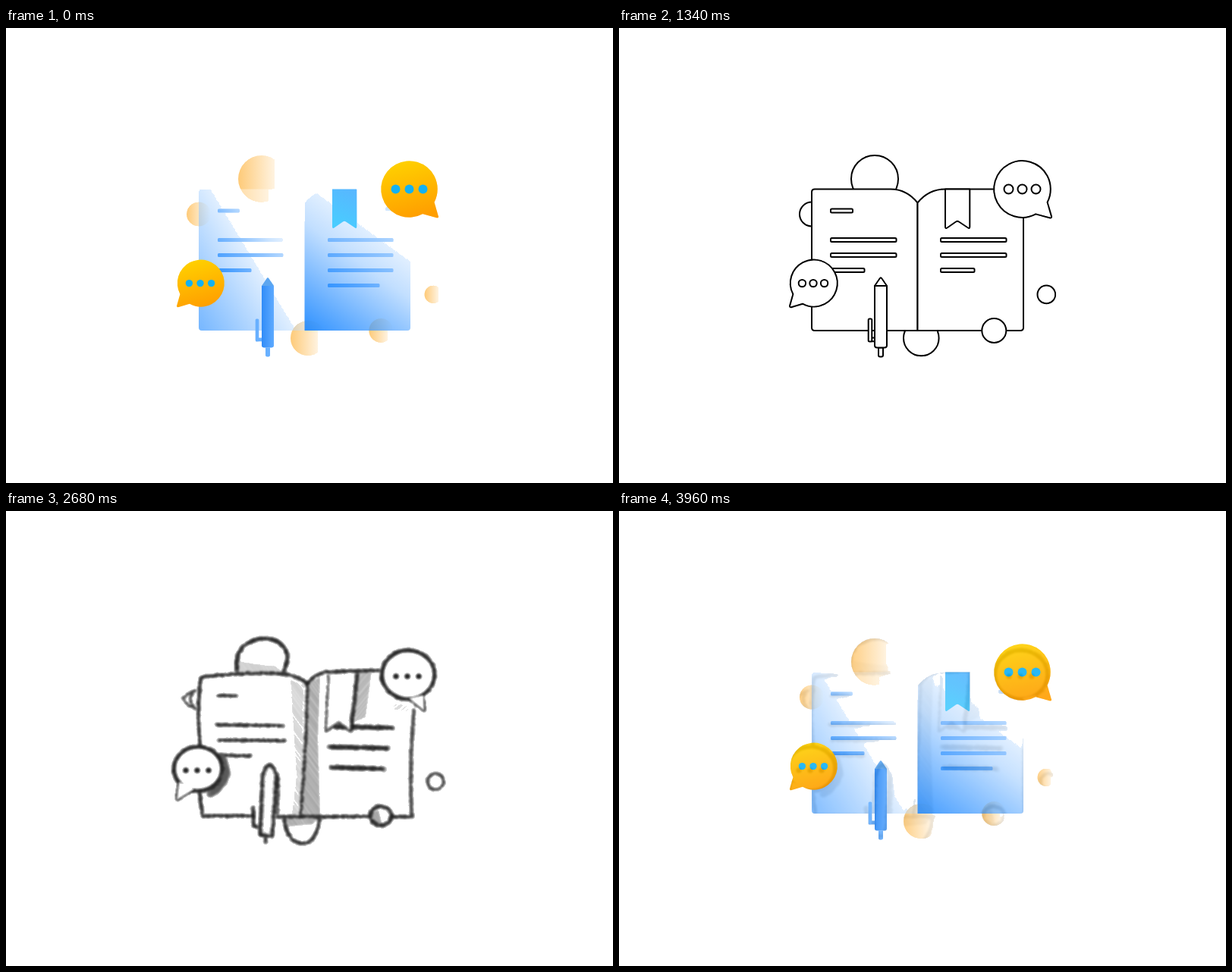
These frames come from a looping animation (800x600 px, 4020 ms). An HTML page with a canvas:

```html
<!DOCTYPE html>
<html lang="en">
<head>
<meta charset="utf-8">
<title>Notebook: sketch, outline, colour</title>
<style>
html, body { margin: 0; width: 100%; height: 100%; overflow: hidden; background: #fff; }
canvas { display: block; }
</style>
</head>
<body>
<canvas id="stage" width="800" height="600"></canvas>
<script>
const W = 800, H = 600, TAU = Math.PI * 2;

function layer(draw) {
  const c = document.createElement('canvas');
  c.width = W; c.height = H;
  const g = c.getContext('2d', { willReadFrequently: true });
  g.fillStyle = '#fff';
  g.fillRect(0, 0, W, H);
  g.lineCap = g.lineJoin = 'round';
  draw(g, c);
  return g.getImageData(0, 0, W, H).data;
}

// Shapes shared by the colour and outline looks
const disc = (x, y, r) => { const p = new Path2D(); p.arc(x, y, r, 0, TAU); return p; };
const box = (x, y, w, h, r) => { const p = new Path2D(); p.roundRect(x, y, w, h, r); return p; };
const bar = (x, y, w) => box(x, y - 2.5, w, 5, 1.5);
const row = i => 279.5 + 20 * i;
const rowWidth = i => i < 2 ? 86.5 : 44.5;

function bubble(x, y, r, a, b, tx, ty) {
  const p = new Path2D();
  p.arc(x, y, r, a, b + TAU);
  p.arcTo(tx, ty, x + r * Math.cos(a), y + r * Math.sin(a), 1.5);
  p.closePath();
  return p;
}
const threeDots = (x, y, gap, r) => [-1, 0, 1].map(i => disc(x + i * gap, y, r));

const leftPage = new Path2D('M258 212.5H358Q379 212.5 393.5 230.5V399H258Q254 399 254 395V216.5Q254 212.5 258 212.5Z');
const rightPage = new Path2D('M393.5 230.5Q408 212.5 430 212.5H529Q533 212.5 533 216.5V395Q533 399 529 399H393.5Z');
const ribbon = new Path2D('M430 212.5H462.3V262Q462.3 265 460 263.5L448 255.5Q446 254 444 255.5L432.5 263.5Q430 265 430 262Z');
const penTip = new Path2D('M337 340L343.5 330.5Q345 328 346.5 330.5L353 340Z');
const penBody = box(337, 340, 16, 81.5, [0, 0, 3, 3]);
const penEnd = box(342, 421.5, 6, 12, [0, 0, 2, 2]);
const clipBar = box(328.7, 383.5, 4.6, 30, 1.5);
const clipArm = box(332.5, 408.5, 4.5, 4.8, 0);
const balls = [[337, 199, 31], [254, 245.5, 16], [398.3, 409, 23.3], [494.3, 399, 16], [563.3, 351.4, 11.8]];
const bigBubble = bubble(531.5, 212.5, 37.3, 1.077, .481, 570.8, 251.2);
const smallBubble = bubble(256.8, 336.5, 31, 2.656, 2.07, 224.3, 369);
const dots = [...threeDots(531.5, 212.5, 18, 6), ...threeDots(256, 336.6, 14.6, 4.7)];

function paintColour(g) {
  const fill = (path, x0, y0, x1, y1, ...stops) => {
    const lg = g.createLinearGradient(x0, y0, x1, y1);
    stops.forEach(([at, c]) => lg.addColorStop(at, c));
    g.fillStyle = lg;
    g.fill(path);
  };
  const blue = a => `rgba(18,130,255,${a})`;
  const veil = p => { g.fillStyle = 'rgba(255,255,255,.35)'; g.fill(p); };
  const line = (x, y, w, a, b) => fill(bar(x, y, w), x, 0, x + w, 0, [0, blue(a)], [1, blue(b)]);

  for (const [x, y, r] of balls)
    fill(disc(x, y, r), x - r, 0, x + r, 0, [0, 'rgb(254,202,120)'], [1, '#fff']);

  veil(leftPage);
  fill(leftPage, 254, 398, 374, 325.5, [0, blue(.58)], [1, blue(0)]);
  veil(rightPage);
  fill(rightPage, 394, 398, 508.5, 241.4, [0, blue(.88)], [.59, blue(.26)], [1, blue(0)]);

  line(279, 241, 29, .45, .27);
  line(500, 238.5, 28, .2, .15);
  for (let i = 0; i < 4; i++) {
    if (i < 3) line(279, row(i), rowWidth(i), .52 + .12 * i, .13 + .2 * i);
    line(424, row(i), i < 3 ? 86.5 : 68.5, .44 + .08 * i, .28 + .05 * i);
  }

  fill(ribbon, 460, 212, 436, 262, [0, 'rgb(88,182,255)'], [1, 'rgb(72,205,255)']);

  g.fillStyle = 'rgb(104,176,255)';
  [clipBar, clipArm, penEnd].forEach(p => g.fill(p));
  fill(penBody, 337, 0, 353, 0, [0, 'rgb(48,140,248)'], [1, 'rgb(94,170,255)']);
  g.fillStyle = 'rgb(92,166,240)';
  g.fill(penTip);

  const sun = [[0, 'rgb(255,208,0)'], [1, 'rgb(255,158,0)']];
  fill(bigBubble, 520, 176, 540, 250, ...sun);
  fill(smallBubble, 247, 306, 264, 368, ...sun);
  g.fillStyle = 'rgb(18,177,243)';
  dots.forEach(d => g.fill(d));
}

function paintOutline(g) {
  g.lineWidth = 2;
  g.strokeStyle = '#000';
  g.fillStyle = '#fff';
  const ink = p => { g.fill(p); g.stroke(p); };
  const rounds = balls.map(b => disc(...b));

  [...rounds.slice(0, 3), leftPage, rightPage, ribbon, bar(279, 241, 29)].forEach(ink);
  for (const x of [279, 424])
    for (let i = 0; i < 3; i++) ink(bar(x, row(i), rowWidth(i)));
  [...rounds.slice(3), clipArm, clipBar, penEnd, penBody, penTip, bigBubble, smallBubble, ...dots].forEach(ink);
}

function paintSketch(g, canvas) {
  let seed = 7;
  const rnd = () => (seed = seed * 16807 % 2147483647) / 2147483647;
  const jit = n => (rnd() - .5) * n;
  const track = document.createElementNS('http://www.w3.org/2000/svg', 'path');

  // Charcoal stroke: uneven dabs along a path
  function pencil(d, w, tone = 30) {
    track.setAttribute('d', d);
    g.fillStyle = `rgba(${tone},${tone},${tone},.36)`;
    for (let s = 0, n = track.getTotalLength(); s <= n; s++) {
      const { x, y } = track.getPointAtLength(s);
      g.fill(disc(x + jit(1.8), y + jit(1.8), w / 2 * (.65 + rnd() * .5)));
    }
  }
  const ring = (x, y, rx, ry) => `M${x - rx} ${y}a${rx} ${ry} 0 1 1 ${2 * rx} 0a${rx} ${ry} 0 1 1 ${-2 * rx} 0`;

  function paper(d, tone = 255) {
    g.fillStyle = `rgb(${tone},${tone},${tone})`;
    g.fill(new Path2D(d));
  }
  function shade(d, base, tone, slope = 1.4) {
    paper(d, base);
    g.save();
    g.clip(new Path2D(d));
    g.strokeStyle = `rgba(${tone},${tone},${tone},.6)`;
    g.lineWidth = 1.6;
    for (let y = -500; y < 1100; y += 5 + jit(3)) {
      g.beginPath();
      g.moveTo(200, y);
      g.lineTo(600, y + 400 * slope);
      g.stroke();
    }
    g.restore();
  }
  function speech(x, y, rx, ry, tail) {
    const round = ring(x, y, rx, ry);
    const lg = g.createLinearGradient(x - rx, y + ry, x + rx, y - ry);
    lg.addColorStop(0, 'rgb(234,234,234)');
    lg.addColorStop(1, '#fff');
    pencil(tail, 5);
    pencil(round, 6.5);
    g.fillStyle = lg;
    g.fill(new Path2D(tail));
    g.fill(new Path2D(ring(x, y, rx - 2.5, ry - 2.5)));
    g.fillStyle = '#262626';
    threeDots(x - 1, y + 2, 15, 3.6).forEach(d => g.fill(d));
  }

  // Circles behind the book
  shade('M305 197Q325 202 356 204L364 212H306Z', 222, 190);
  pencil('M305 211C294 156 379 156 370 200L366 212', 6);
  pencil('M251 237Q240 239 233 247Q240 258 251 261M246 240Q240 248 247 258', 4.5, 50);
  shade('M368 404H412L404 413L372 416Z', 205, 130);
  pencil('M367 406C370 449 411 449 413 406', 5.5);

  // Gutter shading
  shade('M374 222L393 229L389 400H376L382 350Z', 244, 165);
  shade('M399 228L414 219L411 300L414 402H391Z', 205, 125);
  shade('M463 213L482 210L474 272L460 278Z', 208, 145, -1.2);

  // Book
  pencil('M256 310Q251 260 257 219Q310 213 355 214Q385 216 398 228Q407 212 430 212L492 210', 5.5);
  pencil('M255 370L259 402L326 402M356 403L535 403', 5.5);
  pencil('M535 403Q531 340 538 262', 5.5, 55);
  pencil('M397 227Q396 310 388 403', 5);

  // Writing
  pencil('M278 243L304 244', 5);
  for (let i = 0; i < 3; i++) {
    pencil(`M${277 + 3 * i} ${282 + 20 * i}l${i < 2 ? 88 : 39} 1`, 5.5);
    pencil(`M${424 + 2 * i} ${284 + 27 * i}L${510 - 6 * i} ${286 + 27 * i}`, 7);
  }

  // Ribbon
  paper('M424 216H463L455 290L438 279L422 290Z', 246);
  pencil('M425 217L421 291L438 279L454 291', 4, 60);
  pencil('M463 215L455 290', 6);

  // Speech bubbles, the left one with a cast shadow
  pencil('M282 322Q304 352 268 374', 10, 90);
  shade('M508 252L534 256L530 266L511 263Z', 242, 180, -.8);
  speech(530, 216, 34.5, 32, 'M531 247L551 263L550 243');
  speech(253, 340, 31.5, 29, 'M228 357L225 381L248 367');

  // Pen
  const pen = 'M335 427L338 348Q348 322 357 348L351 429Z';
  pencil('M359 352L358 400', 5, 60);
  paper(pen, 232);
  pencil(pen, 5.5);
  pencil('M342 431v6M326 390v25l7 2', 6);

  // Loose circles
  paper(ring(494, 402, 14, 13));
  shade('M482 397L491 395L495 411L486 412Z', 190, 120);
  pencil(ring(494, 402, 14, 12.5), 6);
  pencil(ring(566, 357, 10.5, 10.5), 5, 45);

  g.filter = 'blur(.8px)';
  g.drawImage(canvas, 0, 0);
}

const looks = [paintColour, paintOutline, paintSketch].map(layer);
const ctx = document.getElementById('stage').getContext('2d');
const picture = ctx.createImageData(W, H);
const CUT = 224;   // paler pixels drop to pure white

function blend(from, to, k) {
  const out = picture.data;
  const mix = i => from[i] + (to[i] - from[i]) * k;
  for (let i = 0; i < out.length; i += 4) {
    const r = mix(i), g = mix(i + 1), b = mix(i + 2);
    const pale = Math.min(r, g, b) > CUT;
    out[i] = pale ? 255 : r;
    out[i + 1] = pale ? 255 : g;
    out[i + 2] = pale ? 255 : b;
    out[i + 3] = 255;
  }
  ctx.putImageData(picture, 0, 0);
}

// Each look holds 800 ms, then fades to the next in steps of 60 ms
const HOLD = 800, STEP = 60, PART = 1340;
const start = performance.now();
let shown = -1;

function tick() {
  const t = (performance.now() - start) % (PART * looks.length);
  const part = Math.floor(t / PART), u = t - part * PART;
  const step = u < HOLD ? 0 : Math.floor((u - HOLD) / STEP) + 1;
  const key = part * 10 + step;
  if (key !== shown) {
    shown = key;
    blend(looks[part], looks[(part + 1) % looks.length], step / 10);
  }
  requestAnimationFrame(tick);
}
tick();
</script>
</body>
</html>
```
